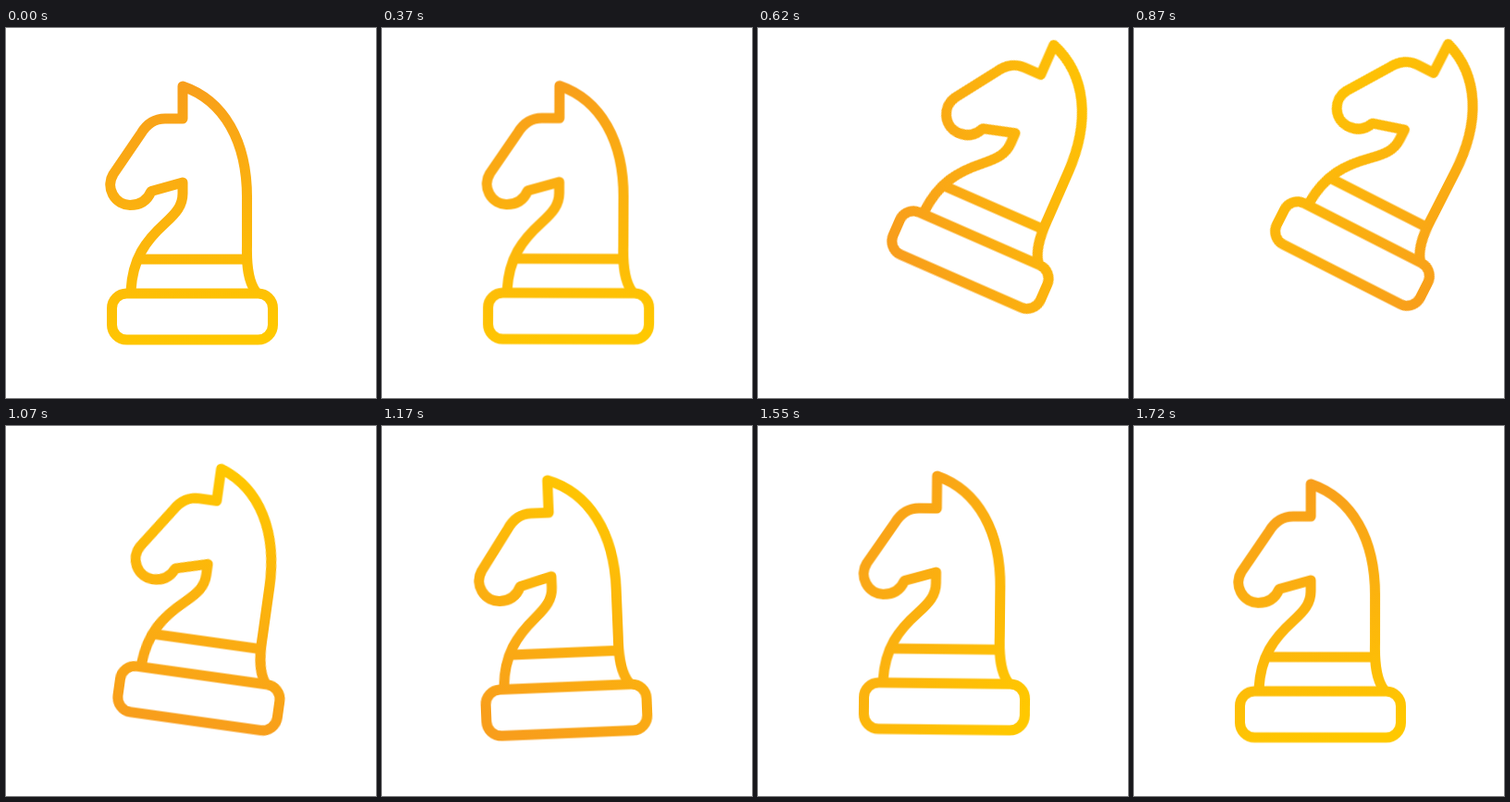
Recreate the animation shown at these times as an HTML page without scripts. Size 400 by 400 pixels, loop 1750 ms.

```html
<!DOCTYPE html>
<html lang="en">
<head>
<meta charset="utf-8">
<title>Chess knight</title>
<style>
  html, body { margin: 0; height: 100%; overflow: hidden; background: #fff; }
  svg { display: block; width: 100%; height: 100%; }

  .lift, .drift, .tilt { animation: 1750ms infinite; }
  .lift { animation-name: lift; }
  .drift { animation-name: drift; }
  .tilt { animation-name: tilt; transform-origin: 201.5px 312px; }

  .piece {
    fill: none;
    stroke: url(#gold);
    stroke-width: 11;
    stroke-linecap: round;
    stroke-linejoin: round;
  }

  /* jump, fall, small bounce */
  @keyframes lift {
    0% { transform: none; }
    21.14% { transform: none; animation-timing-function: cubic-bezier(.3, 1.04, .66, 1); }
    49.71% { transform: translateY(-68px); animation-timing-function: cubic-bezier(.37, 0, .63, 1); }
    66.29% { transform: translateY(-4px); animation-timing-function: cubic-bezier(.33, .67, .67, 1); }
    80% { transform: translateY(-14.5px); animation-timing-function: cubic-bezier(.37, 0, .63, 1); }
    100% { transform: none; }
  }

  @keyframes drift {
    0% { transform: none; }
    21.14% { transform: none; animation-timing-function: cubic-bezier(.33, .82, .67, 1); }
    49.71% { transform: translateX(34.5px); animation-timing-function: cubic-bezier(.37, 0, .63, 1); }
    66.86% { transform: translateX(-2px); }
    74.29% { transform: translateX(-2px); animation-timing-function: cubic-bezier(.37, 0, .63, 1); }
    90.29%, 100% { transform: none; }
  }

  @keyframes tilt {
    0% { transform: rotate(0deg); }
    21.14% { transform: rotate(0deg); animation-timing-function: cubic-bezier(.33, 1, .67, 1); }
    49.71% { transform: rotate(27deg); animation-timing-function: cubic-bezier(.37, 0, .63, 1); }
    69.71% { transform: rotate(-3.8deg); animation-timing-function: cubic-bezier(.37, 0, .63, 1); }
    90.29% { transform: rotate(.7deg); animation-timing-function: cubic-bezier(.37, 0, .63, 1); }
    100% { transform: rotate(0deg); }
  }
</style>
</head>
<body>
<svg viewBox="0 0 400 400">
  <defs>
    <linearGradient id="gold" gradientUnits="userSpaceOnUse" x1="201" y1="58" x2="201" y2="342"
                    gradientTransform="rotate(-10 201 200)">
      <stop offset="0" stop-color="#f89e1b"/>
      <stop offset="1" stop-color="#ffc800"/>
      <!-- the shading swings over with the jump and back again -->
      <animateTransform attributeName="gradientTransform" type="rotate" dur="1750ms" repeatCount="indefinite"
        calcMode="spline" keyTimes="0; .211; .497; 1"
        keySplines="0 0 1 1; 0 0 1 1; .2 .3 .8 .9"
        values="-10 201 200; -10 201 200; -245 201 200; -10 201 200"/>
    </linearGradient>
  </defs>
  <g class="lift"><g class="drift"><g class="tilt piece">
    <rect x="114.5" y="287" width="174" height="50" rx="16"/>
    <path d="M146 250H259"/>
    <path d="M135 284C137 249 151 230 172 211C184 200 191 192 191 179V167L157 176.5
             C153 186 145 191.5 134 191.5A22 22 0 0 1 116 158L146 114
             C152 104 161 98 172 98H191V63C235 78 261.5 122 260.5 187V236C260 258 262 274 270 285"/>
  </g></g></g>
</svg>
</body>
</html>
```
